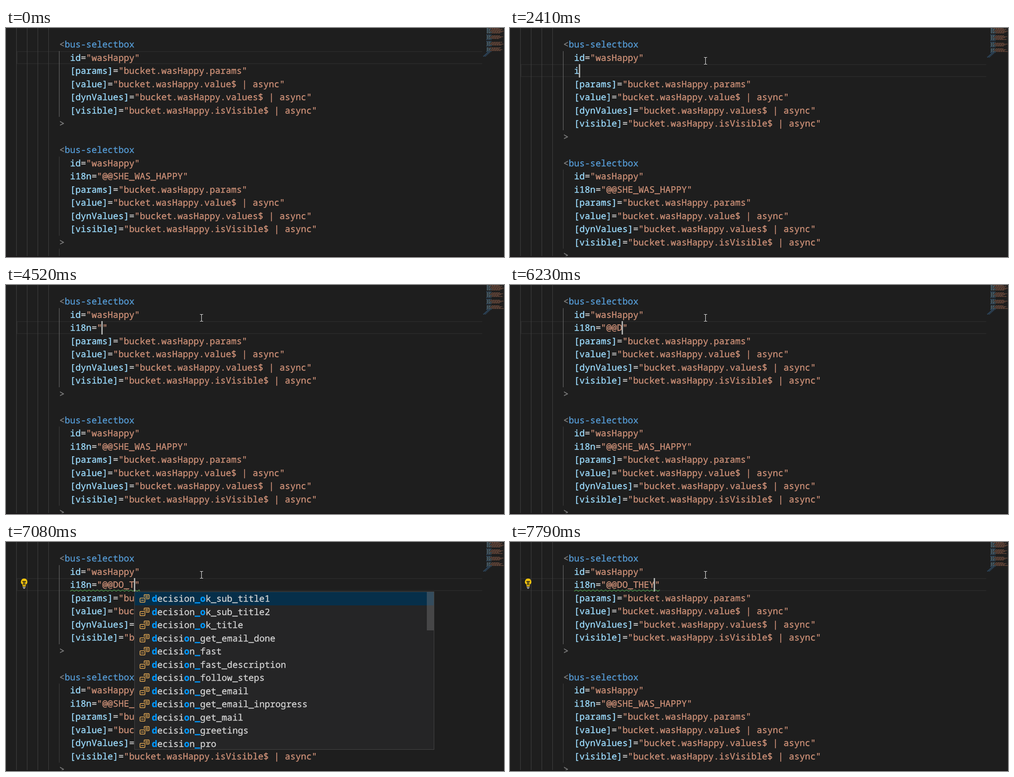
Animation, 1071 px wide and 495 px high, one loop 8000 ms. Source, as an HTML page:

```html
<!DOCTYPE html>
<html lang="en">
<head>
<meta charset="utf-8">
<title>Editor typing</title>
<style>
html, body { margin: 0; width: 100%; height: 100%; overflow: hidden; background: #1e1e1e; }
#stage {
  position: relative; width: 1071px; height: 495px; overflow: hidden;
  font: 19.25px/27px "Noto Sans Mono", monospace; -webkit-text-stroke: .35px;
  font-variant-ligatures: none; text-rendering: geometricPrecision; color: #d4d4d4;
}
#stage div { position: absolute; box-sizing: border-box; white-space: pre; }
#stage svg { position: absolute; left: 0; top: 0; }
.current { left: 23px; width: 1001px; height: 28px; border: 2px solid #282828; border-right: 0; }
.guide { width: 1px; background: #404040; }
.guide.active { background: #707070; }
.line { left: 114.6px; }
.punct { color: #808080; }
.tag { color: #569cd6; }
.attr { color: #9cdcfe; }
.str { color: #ce9178; }
.caret { width: 3px; height: 28.5px; background: #aeafad; }
.popup { top: 107px; width: 645px; background: #252526; border: 1px solid #454545; overflow: hidden; }
.popup .item { left: 0; width: 643px; height: 28.5px; padding-left: 36.6px; }
.popup .selected { background: #062f4a; }
.popup b { color: #0097fb; }
.popup svg { left: 9px !important; top: 2px !important; }
.popup .thumb { right: 0; top: 0; width: 15px; background: rgba(121, 121, 121, .4); }
.popup .message { left: 12px; top: 0; }
.edge { left: 0; bottom: 0; width: 1071px; height: 2px; background: #191617; }
</style>
</head>
<body>
<div id="stage">
  <div id="view"></div>
  <div class="edge"></div>
  <svg width="1071" height="495" fill="none">
    <circle id="click" cx="418" cy="70" r="15" fill="rgba(255,255,0,.47)"/>
    <g id="mouse">
      <path d="M-3.5-7.5h2.5l1 1 1-1h2.5M0-6.5v13M-3.5 7.5h2.5l1-1 1 1h2.5" stroke="#000" stroke-width="3" opacity=".35"/>
      <path d="M-3.5-7.5h2.5l1 1 1-1h2.5M0-6.5v13M-3.5 7.5h2.5l1-1 1 1h2.5" stroke="#e4e4e4" stroke-width="1.2"/>
    </g>
  </svg>
</div>
<script>
const LOOP = 8000, ROW = 28.5, TOP = 21.5, CHAR = 11.55, LEFT = 137.5;
const rowY = row => Math.floor(TOP + ROW * row);
const colX = col => LEFT + CHAR * col;

const attributes = ['inert', 'inputmode', 'is', 'itemid', 'itemprop', 'itemref', 'itemscope',
  'itemtype', 'aria-hidden', 'aria-invalid', 'hidden', 'title'];
const decision = names => names.split(' ').map(name => 'decision_' + name);
const keysD = ['DAY_LBL', 'DAY_PLACEHOLDER_LBL', 'dataUsageWarning',
  ...decision('fast fast_description follow_steps get_email get_email_done get_email_inprogress get_mail greetings ok_sub_title1')];
const keysDo = decision('ok_sub_title1 ok_sub_title2 ok_title get_email_done fast fast_description follow_steps get_email get_email_inprogress get_mail greetings pro');

const lists = {
  i: { items: attributes, match: /i/, thumb: 49, opacity: .5 },
  d: { items: keysD, match: /^d/i, thumb: 48, opacity: .5 },
  do: { items: keysDo, match: /^d|(?<=_)o(?=k)|(?<=i)o(?=n_(?!ok))/g, thumb: 83, opacity: 1 },
  do_: { items: keysDo, match: /^d|_o(?=k)|(?<=i)o(?=n_(?!ok))|(?<=n)_(?!ok)/g, thumb: 83, opacity: 1 },
  do_t: { items: keysDo, match: /^d|_o(?=k)|(?<=i)o(?=n_(?!ok))|(?<=n)_(?!ok)|t(?=itle)/g, thumb: 83, opacity: 1 },
  none: { items: [] }
};

// Each step changes part of the state; text is what stands before the caret.
const key = 'i18n="@@';
const steps = [
  [0, { text: null, tail: '', caret: false, click: false, list: '', squiggle: 0, bulb: false, unquoted: false }],
  [1100, { click: true }],
  [1170, { caret: true }],
  [1330, { click: false }],
  [1650, { caret: false }],
  [1800, { text: '', caret: true }],
  [2270, { caret: false }],
  [2410, { text: 'i', caret: true }],
  [2490, { list: 'i' }],
  [2660, { text: 'i1', list: '' }],
  [2890, { text: 'i18' }],
  [3040, { text: 'i18n' }],
  [3500, { text: 'i18n=', unquoted: true }],
  [3980, { caret: false }],
  [4450, { text: 'i18n="', tail: '"', caret: true }],
  [4520, { unquoted: false }],
  [4990, { text: 'i18n="@' }],
  [5220, { text: key }],
  [5680, { caret: false }],
  [6230, { text: key + 'D', caret: true }],
  [6300, { list: 'd', squiggle: 10 }],
  [6380, { text: key + 'DO', squiggle: 11 }],
  [6460, { list: 'do' }],
  [6870, { text: key + 'DO_', squiggle: 12 }],
  [6920, { list: 'do_', bulb: true }],
  [7080, { text: key + 'DO_T', squiggle: 13 }],
  [7150, { list: 'do_t' }],
  [7240, { text: key + 'DO_TH' }],
  [7320, { text: key + 'DO_THE' }],
  [7410, { list: 'none' }],
  [7560, { text: key + 'DO_THEY', list: '' }],
  [7790, { squiggle: 16 }]
];

const span = (cls, text) => `<span class="${cls}">${text.replace('<', '&lt;')}</span>`;
const box = (cls, style, html = '') => `<div class="${cls}" style="${style}">${html}</div>`;

const block = label => ['<bus-selectbox', '  id="wasHappy"',
  ...(label === null ? [] : ['  ' + label]),
  '  [params]="bucket.wasHappy.params"',
  '  [value]="bucket.wasHappy.value$ | async"',
  '  [dynValues]="bucket.wasHappy.values$ | async"',
  '  [visible]="bucket.wasHappy.isVisible$ | async"', '>'];

function colorize(line, asValue) {
  if (line[0] === '<') return span('punct', '<') + span('tag', line.slice(1));
  if (line[0] === '>') return span('punct', line);
  if (asValue) return span('str', line);
  const [name, value] = line.split('=');
  return span('attr', name) + (value === undefined ? '' : '=' + span('str', value));
}

function guides(shift) {
  const guide = (x, from, to, active = '') =>
    box('guide ' + active, `left:${x}px;top:${from}px;height:${to - from}px`);
  return [22, 45, 68, 91].map(x => guide(x, 0, 495)).join('')
    + guide(114, rowY(1), rowY(6 + shift), 'active')
    + guide(114, rowY(9 + shift), rowY(15 + shift))
    + guide(114, rowY(16 + shift), rowY(18 + shift));
}

const icon = `<svg width="24" height="24" viewBox="0 0 16 16"><path fill="none" stroke="#e8ab53"
  d="M7.5 6V3l.5-.5h6l.5.5v5l-.5.5h-4M9 4.5h4M9 6.5h4M2 7.5h6l.5.5v5l-.5.5H2l-.5-.5V8zM3 10.5h4"/></svg>`;

function popup(list, col) {
  const { items, match, thumb, opacity } = lists[list];
  const rows = items.map((item, i) => box('item' + (i ? '' : ' selected'), `top:${Math.round(i * ROW)}px`,
    icon + item.replace(match, '<b>$&</b>'))).join('');
  const content = items.length
    ? rows + box('thumb', `height:${thumb}px;opacity:${opacity}`)
    : box('message', '', 'No suggestions.');
  return box('popup', `left:${Math.round(colX(col))}px;height:${Math.max(1, items.length) * ROW}px`, content);
}

function minimap(shift) {
  const rows = [...('aaaaaa-t' + (shift ? 'a' : '') + 'aaaat-taaaat-aaaatttttt')];
  const tail = rows.length - 5;
  const stroke = (x, y, end, color) =>
    `<path d="M${x} ${y + .8}H${end}" stroke="${color}" stroke-width="1.4" stroke-dasharray="2.4 .8 1.2 .6"/>`;
  return rows.map((kind, i) => {
    const y = i * 2;
    if (kind === '-') return '';
    if (i >= tail) return stroke(1035 - (i - tail) * 2.2, y, 1041 - (i - tail) * 2.2, '#35597a');
    if (kind === 't') return stroke(1033, y, 1044, '#35597a');
    const split = 1039 + i * 5 % 7;
    return stroke(1034, y, split, '#587482') + stroke(split + 1, y, 1061 + i * 7 % 11, '#7d5443');
  }).join('');
}

function wave(cols) {
  const end = colX(cols);
  let path = 'M138 106.5';
  for (let x = 138, up = true; x < end; x += 4.5, up = !up) {
    const next = Math.min(x + 4.5, end);
    path += `L${next} ${up ? 103.5 : 106.5}`;
  }
  return cols ? `<path d="${path}" stroke="#4d9e4d" stroke-width="1.4" fill="none"/>` : '';
}

const bulb = `<path fill="#f3c40c" d="M39 79a7 7 0 0 1 3.5 13v4h-7v-4A7 7 0 0 1 39 79z"/>
  <path stroke="#1e1e1e" fill="none" stroke-width="1.6" d="M35 85.2h8M37.6 85.5v8M40.4 85.5v8"/>
  <path stroke="#c5c5c5" stroke-width="1.5" d="M36 97.8h6M37 100.3h4"/>`;

const view = document.getElementById('view');
const click = document.getElementById('click');
const mouse = document.getElementById('mouse');

function render(s) {
  const added = s.text !== null, shift = added ? 1 : 0;
  const row = 1 + shift, col = added ? s.text.length : 13;
  const lines = [...block(added ? s.text + s.tail : null), '', ...block('i18n="@@SHE_WAS_HAPPY"')];
  view.innerHTML = box('current', `top:${rowY(row)}px`)
    + guides(shift)
    + lines.map((line, i) => box('line', `top:${rowY(i)}px`, colorize(line, s.unquoted && i === 3))).join('')
    + `<svg width="1071" height="495">${minimap(shift)}${wave(s.squiggle)}${s.bulb ? bulb : ''}</svg>`
    + (s.caret ? box('caret', `left:${Math.round(colX(col) - 1.4)}px;top:${rowY(row)}px`) : '')
    + (s.list ? popup(s.list, col) : '');
  click.style.display = s.click ? '' : 'none';
}

function moveMouse(t) {
  const step = Math.min(9, Math.floor((t - 230) / (700 / 9)));
  const p = Math.max(0, step) / 9, eased = p * p * (3 - 2 * p);
  mouse.style.display = t < 230 ? 'none' : '';
  mouse.setAttribute('transform', `translate(${Math.round(746 - 326 * eased) + .5} ${Math.round(385 - 314 * eased)})`);
}

let shown = 0;
function frame() {
  const t = performance.now() % LOOP;
  const past = steps.filter(([time]) => time <= t);
  if (past.length !== shown) {
    shown = past.length;
    render(Object.assign({}, ...past.map(([, change]) => change)));
  }
  moveMouse(t);
  requestAnimationFrame(frame);
}
frame();
</script>
</body>
</html>
```
